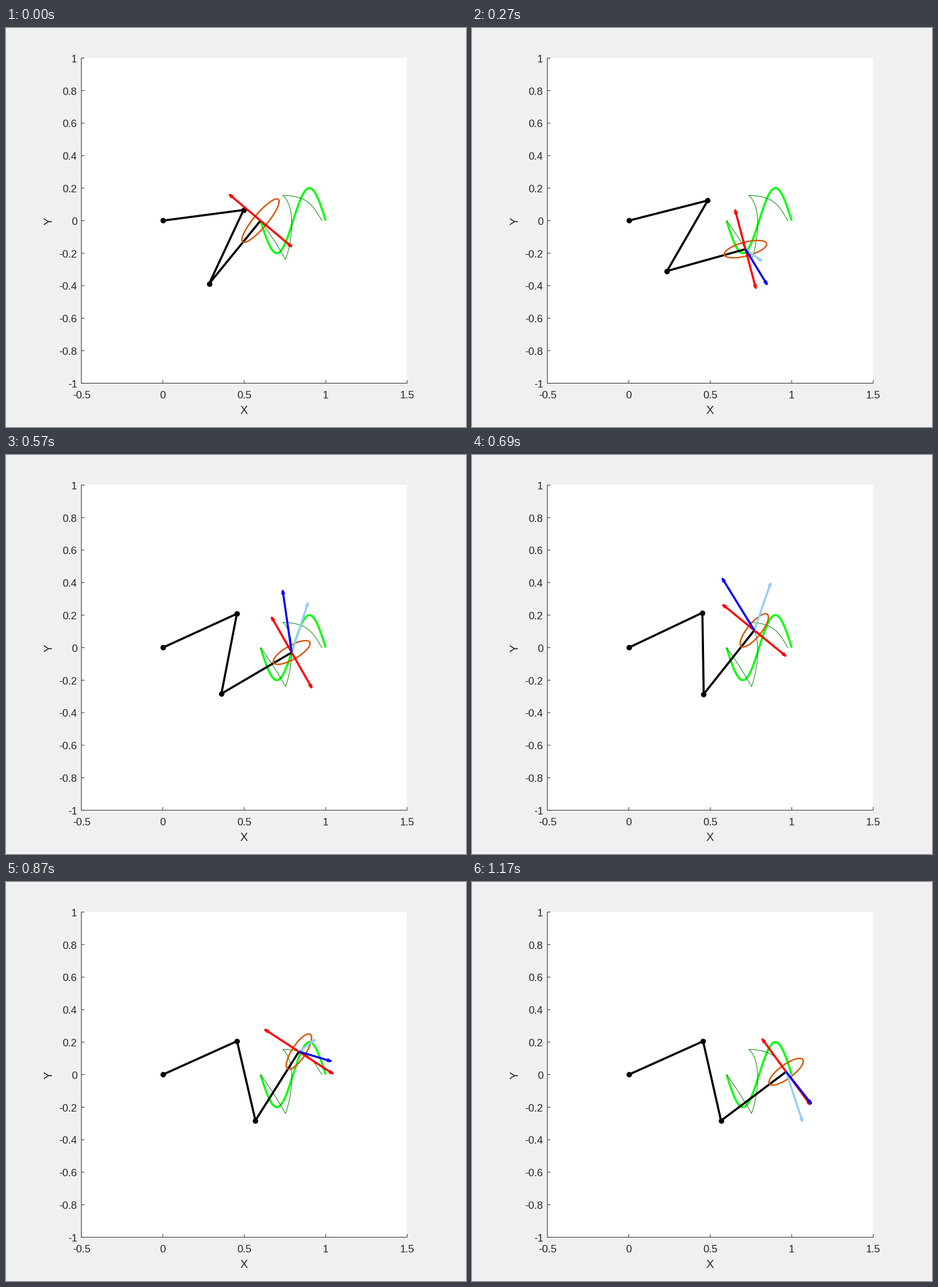
Write a matplotlib script that moves like this. It is 803 px wide and 697 px high and loops after 1200 ms.

```python
import numpy as np
import matplotlib.pyplot as plt
from matplotlib.animation import FuncAnimation

W, H, DPI = 803, 697, 72          # at 72 dpi one point is one pixel
STEPS, STEP_MS = 40, 30
SCALE = 284.4                     # pixels per data unit
LINK = 0.5 * SCALE
BASE = np.array([273.7, 336.5])
INK = "#262626"

plt.rcParams["font.family"] = "Liberation Sans"
fig = plt.figure(figsize=((W + 1e-6) / DPI, (H + 1e-6) / DPI), dpi=DPI,
                 facecolor="#f0f0f0")
ax = fig.add_axes([0, 0, 1, 1])
ax.set_xlim(0, W)
ax.set_ylim(H, 0)
ax.axis("off")


def curve(*keys):
    """Polynomial motion through a few (step, x, y) keys."""
    k, x, y = np.array(keys, float).T
    mid = k.mean()
    fits = [np.polyfit(k - mid, v, len(k) - 1) for v in (x, y)]
    return lambda s: np.array([np.polyval(f, s - mid) for f in fits])


# The hand turns sharply at two steps, so its motion has three smooth pieces
TURNS = [0, 12, 25, STEPS]
PATHS = [
    curve((0, 444.3, 336.5), (9, 477.4, 386.3), (12, 487.8, 404.3)),
    curve((12, 487.8, 404.3), (15, 493.8, 384.3), (23, 492.8, 306.3),
          (25, 483.3, 292.3)),
    curve((25, 483.3, 292.3), (29, 511.3, 296.3), (33, 529.3, 306),
          (40, 551.6, 337)),
]
SPEEDS = [
    curve((0, 37, 56), (12, 38, 64)),
    curve((15, 9.5, -81), (18, -8, -106), (23, -56, -91)),
    curve((26, 60, 5), (39, 44, 56)),
]


def piece(k):
    return int(k > TURNS[1]) + int(k > TURNS[2])


def ray(angle):
    """Unit vector on screen for an angle measured upwards."""
    return np.array([np.cos(angle), -np.sin(angle)])


def shoulder(k):
    """Smooth rise with a slight overshoot."""
    rise = 1 - np.exp(-(k / 11.26) ** 2.89)
    overshoot = np.exp(-((k - 22.5) / 4) ** 2)
    return np.radians(7.5 + 16.7 * rise + 1.2 * overshoot)


def arm(k):
    """Joints of the arm and the direction of its last link."""
    end = PATHS[piece(k)](k)
    j1 = BASE + LINK * ray(shoulder(k))
    dx, dy = end - j1
    bend = np.arccos(np.hypot(dx, dy) / (2 * LINK))
    toward = np.arctan2(-dy, dx)
    j2 = j1 + LINK * ray(toward - bend)
    return np.array([BASE, j1, j2, end]), toward + bend


def wanted(k):
    """Velocity along the sine, as a screen vector."""
    phase = 2 * np.pi * (k - 0.5) / STEPS
    return SCALE * np.array([0.1, 0.1 * np.pi * np.cos(phase)])


def line(color, width, z, x=(), y=(), **kw):
    return ax.plot(x, y, color=color, lw=width, zorder=z, snap=False,
                   solid_capstyle="butt", solid_joinstyle="round", **kw)[0]


def arrow(item, tail, vec):
    along = vec / np.hypot(*vec)
    side = 1.4 * np.array([-along[1], along[0]])
    tip = tail + vec - along
    back = tip - 5 * along
    item.set_data(*np.array([tail, tip, back + side, back - side, tip]).T)


def label(x, y, text, size=18.4, **kw):
    ax.text(x, y, text, size=size, color=INK, **{"va": "baseline", **kw})


def draw_axes():
    ax.add_patch(plt.Rectangle((131, 52), 569, 569, fc="white", ec="none", zorder=0))
    line(INK, 1, 1, [131.5, 131.5, 700], [52, 620.5, 620.5])
    for i in range(5):
        x = 131.5 + i * SCALE / 2
        line(INK, 1, 1, [x, x], [620.5, 615])
        label(x, 647.3, f"{-0.5 + 0.5 * i:g}", ha="center")
    for i in range(11):
        y = 52.5 + i * SCALE / 5 * 0.9988
        line(INK, 1, 1, [131.5, 137], [y, y])
        label(124, y + 7.2, f"{round(1 - 0.2 * i, 1):g}", ha="right")
    label(415.7, 674, "X", 20.2, ha="center")
    label(75, 337, "Y", 20.2, ha="center", va="center", rotation=90)


draw_axes()

t = np.linspace(0, 1, 101)
line("#00ff00", 3.6, 2, BASE[0] + SCALE * (0.6 + 0.4 * t),
     BASE[1] + SCALE * 0.2 * np.sin(2 * np.pi * t))
trail = np.hstack([path(np.linspace(a, b, 30))
                   for path, a, b in zip(PATHS, TURNS, TURNS[1:])])
line("#008000", 1, 3, *trail)

links = line("black", 3.7, 4)
joints = line("black", 0, 4.1, marker="o", ms=9.6, mew=0)
ellipse = line("#d95300", 2.5, 5)
axis_arrows = [line("red", 3.6, 6) for _ in range(2)]
wish = line("#99ccff", 3.6, 7)
motion = line("blue", 3.6, 8)
ring = np.linspace(0, 2 * np.pi, 100)


def draw(k):
    pts, heading = arm(k)
    end = pts[-1]
    links.set_data(*pts.T)
    joints.set_data(*pts[:3].T)

    tilt = heading - np.radians(0.8)
    along, across = ray(tilt), ray(tilt + np.pi / 2)
    length = 36 + 12.5 * np.exp(-k / 5)
    ellipse.set_data(*(end[:, None] + length * np.outer(along, np.cos(ring))
                       + 12 * np.outer(across, np.sin(ring))))
    for item, sign in zip(axis_arrows, (1, -1)):
        arrow(item, end, sign * 0.25 * SCALE * across)

    for item, vec in ((wish, wanted(k)), (motion, SPEEDS[piece(k)](k))):
        item.set_visible(k > 0)
        arrow(item, end, vec)
    return [links, joints, ellipse, *axis_arrows, wish, motion]


anim = FuncAnimation(fig, draw, frames=STEPS, interval=STEP_MS,
                     repeat=True, repeat_delay=0)
plt.show()
```
